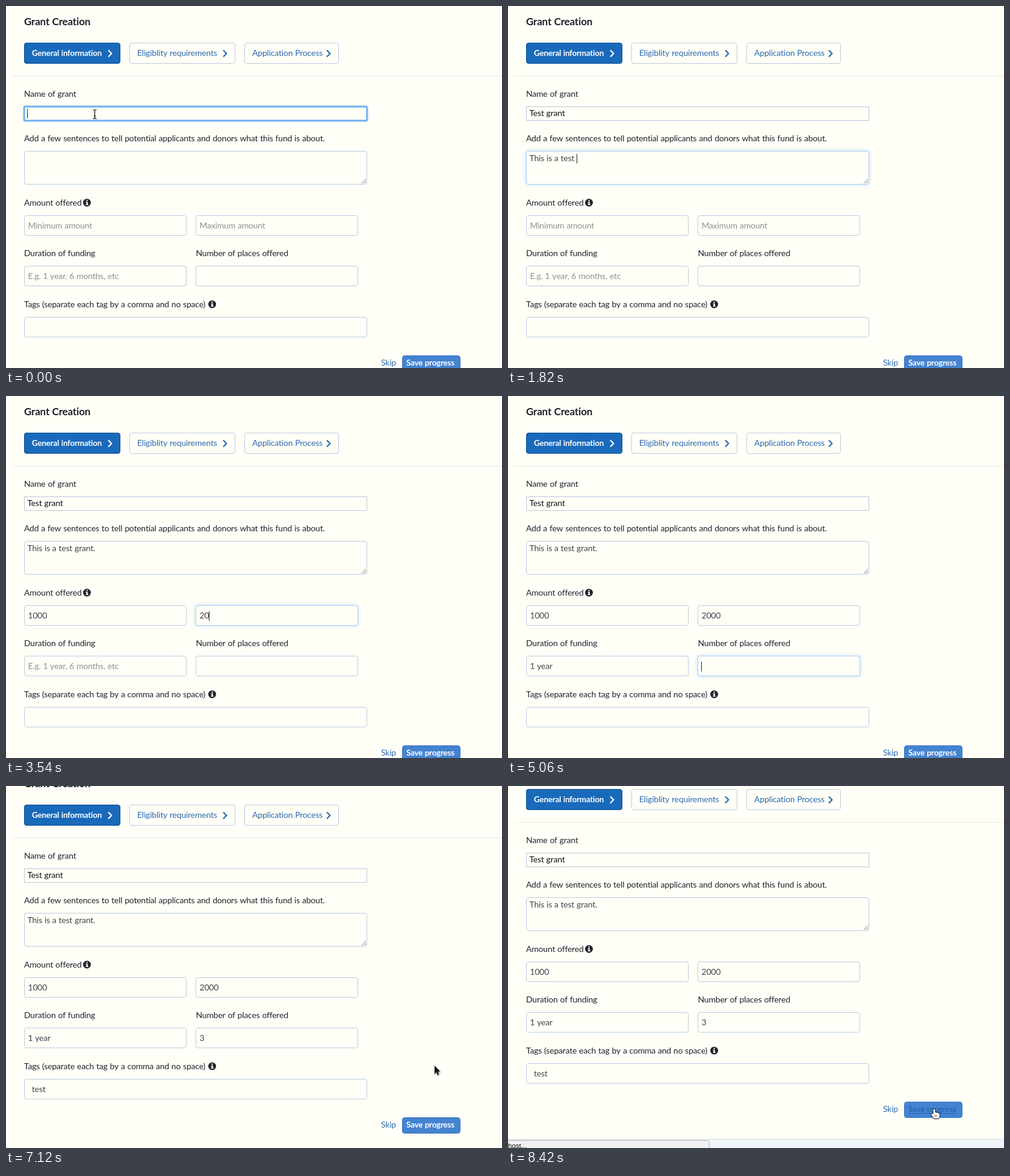
Recreate the animation shown at these times as an HTML page with a canvas. Size 824x602 px, loop 8440 ms.

```html
<!DOCTYPE html>
<html lang="en">
<head>
<meta charset="utf-8">
<title>Grant form</title>
<style>
html, body { margin: 0; width: 100%; height: 100%; overflow: hidden; background: #fffff8; }
canvas { display: block; width: 824px; height: 602px; }
</style>
</head>
<body>
<canvas id="stage" width="824" height="602"></canvas>
<script>
const ctx = document.getElementById('stage').getContext('2d');
const LOOP = 8440, PAGE = '#fffff8', INK = '#1f242b', LINK = '#2c6aae', EDGE = '#bccbe1';
const SANS = 'Lato, "Open Sans", sans-serif';
const ARIAL = '"Liberation Sans", Arial, sans-serif';

// Each field: box, text origin, value, focus span, typing span
const fields = [
  { x: 30, y: 167, w: 570, h: 24, tx: 35.5, ty: 183, value: 'Test grant', focus: [-1000, 1150], typing: [300, 960], plain: true },
  { x: 30, y: 241, w: 570, h: 56, tx: 35.5, ty: 258, value: 'This is a test grant.', focus: [1150, 2450], typing: [1220, 2060], area: true },
  { x: 30, y: 348, w: 270, h: 34, tx: 36.5, ty: 370, value: '1000', hint: 'Minimum amount', focus: [2450, 3160], typing: [2600, 2940] },
  { x: 315, y: 348, w: 270, h: 34, tx: 321.5, ty: 370, value: '2000', hint: 'Maximum amount', focus: [3160, 3980], typing: [3360, 3760] },
  { x: 30, y: 432, w: 270, h: 34, tx: 36.5, ty: 454, value: '1 year', hint: 'E.g. 1 year, 6 months, etc', focus: [3980, 4900], typing: [4120, 4640] },
  { x: 315, y: 432, w: 270, h: 34, tx: 321.5, ty: 454, value: '3', focus: [4900, 5700], typing: [5200, 5260] },
  { x: 30, y: 517, w: 570, h: 34, tx: 43, ty: 539, value: 'test', focus: [5700, 6860], typing: [5900, 6300] }
];
const labels = [
  ['Name of grant', 30, 151],
  ['Add a few sentences to tell potential applicants and donors what this fund is about.', 30, 225],
  ['Amount offered', 30, 332],
  ['Duration of funding', 30, 416],
  ['Number of places offered', 315.5, 416],
  ['Tags (separate each tag by a comma and no space)', 30, 501]
];
// Pointer path: time, x, y
const path = [
  [6400, 300, 192], [6560, 505, 212], [6700, 612, 342],
  [6860, 712, 465], [7420, 712, 465], [7760, 708, 537]
];

const clamp = v => Math.max(0, Math.min(1, v));
const ease = v => v * v * (3 - 2 * v);

function text(str, x, y, color, size = 14, weight = 400, family = SANS) {
  ctx.font = `${weight} ${size}px ${family}`;
  ctx.wordSpacing = family === SANS ? '0.5px' : '0px';
  ctx.letterSpacing = family === SANS ? '-0.2px' : '0px';
  ctx.fillStyle = color;
  ctx.fillText(str, x, y);
  return ctx.measureText(str).width;
}

function box(x, y, w, h, r, fill, stroke, line = 1) {
  ctx.beginPath();
  ctx.roundRect(x + .5, y + .5, w - 1, h - 1, r);
  if (fill) { ctx.fillStyle = fill; ctx.fill(); }
  if (stroke) { ctx.strokeStyle = stroke; ctx.lineWidth = line; ctx.stroke(); }
}

function lines(points, color, width) {
  ctx.beginPath();
  points.forEach(([x, y], i) => i ? ctx.lineTo(x, y) : ctx.moveTo(x, y));
  ctx.strokeStyle = color;
  ctx.lineWidth = width;
  ctx.stroke();
}

function tab(label, x, w, active) {
  const color = active ? '#fff' : LINK;
  box(x, 61, w, 35, 3.5, active ? '#196abb' : PAGE, active ? '#0d4f91' : EDGE);
  text(label, x + 13, 83, color, active ? 13.4 : 14, active ? 700 : 400);
  const cx = x + w - 20;
  lines([[cx, 73.5], [cx + 5.3, 79], [cx, 84.5]], color, 2.2);
}

function info(x, y) {
  ctx.fillStyle = INK;
  ctx.beginPath();
  ctx.arc(x, y, 6.5, 0, 7);
  ctx.fill();
  ctx.fillStyle = PAGE;
  ctx.fillRect(x - 1, y - 4.5, 2.2, 2);
  ctx.fillRect(x - 2, y - 1.3, 3.2, 1.3);
  ctx.fillRect(x - 1, y - 1, 2.2, 4.5);
  ctx.fillRect(x - 2, y + 2.6, 4.4, 1.4);
}

function field(f, t) {
  const [on, off] = f.focus;
  const focused = t >= on && t < off;
  const glow = clamp((t - on) / 150) * (1 - clamp((t - off) / 150));

  if (f.plain) {
    box(f.x, f.y, f.w, f.h, 0, PAGE, '#bcc6dc');
    if (focused) {
      box(f.x - .5, f.y - .5, f.w + 1, f.h + 1, 2, null, '#b4d7f8', 4);
      box(f.x, f.y, f.w, f.h, 1, null, '#68aceb', 2);
    }
  } else {
    box(f.x, f.y, f.w, f.h, 3.5, PAGE, EDGE);
    if (glow > 0) {
      ctx.save();
      ctx.globalAlpha = glow;
      ctx.shadowColor = 'rgba(110, 175, 245, .5)';
      ctx.shadowBlur = 7;
      box(f.x, f.y, f.w, f.h, 3.5, PAGE);
      ctx.shadowColor = 'transparent';
      box(f.x, f.y, f.w, f.h, 3.5, null, '#add0f4');
      ctx.restore();
    }
  }
  if (f.area) {
    const r = f.x + f.w - 2, b = f.y + f.h - 2;
    lines([[r - 7, b], [r, b - 7]], '#777', 1);
    lines([[r - 3, b], [r, b - 3]], '#777', 1);
  }

  const [start, end] = f.typing, n = f.value.length;
  const count = t < start ? 0 : Math.min(n, 1 + Math.floor((t - start) / (end - start) * (n - 1)));
  const typed = f.value.slice(0, count);
  let width = 0;
  if (typed) width = text(typed, f.tx, f.ty, f.plain ? '#101215' : '#424549');
  else if (f.hint) text(f.hint, f.tx, f.ty, '#8e9090');
  if (focused) {
    ctx.fillStyle = '#222';
    ctx.fillRect(Math.round(f.tx + width - .5), f.ty - 12, 1, 16);
  }
}

function saveButton(hover) {
  box(658, 581, 97, 27, 4, '#4483d0', '#3775c1');
  const color = hover ? '#2868b1' : '#fff';
  const w = text('Save progress', 665, 598, color, 13.4, 700);
  if (hover) ctx.fillRect(665, 600, w, 1);
}

function page(t, hover) {
  text('Grant Creation', 30, 32, INK, 17.1, 700);
  tab('General information', 30, 160, true);
  tab('Eligiblity requirements', 205, 176);
  tab('Application Process', 396, 157);
  ctx.fillStyle = '#ecece8';
  ctx.fillRect(10, 116, 814, 1);
  labels.forEach(([s, x, y]) => text(s, x, y, INK));
  info(134.5, 327);
  info(342.5, 496);
  fields.forEach(f => field(f, t));
  if (t >= 5900 && t < 6860) {
    box(30, 551, 571, 26, 0, '#fff', '#a9b9de');
    text('test,tester', 39, 570, '#000', 13.33, 700, ARIAL);
  }
  text('Skip', 623, 598, LINK);
  saveButton(hover);
  ctx.fillStyle = '#eef4fa';
  ctx.fillRect(0, 644, 824, 60);
  ctx.fillStyle = '#d5d8d8';
  ctx.fillRect(0, 643, 824, 1);
}

function statusBar() {
  box(-6, 589, 341, 24, 3, '#f1f1f1', '#b0b2b4');
  text('host...', 0, 602, '#111', 11.5, 400, ARIAL);
}

function pointerAt(t) {
  if (t < 280) return [147, 180];
  if (t < path[0][0]) return null;
  for (let i = 1; i < path.length; i++) {
    const [t0, x0, y0] = path[i - 1], [t1, x1, y1] = path[i];
    if (t < t1) {
      const u = (t - t0) / (t1 - t0), k = t0 > 7000 ? ease(u) : u;
      return [x0 + (x1 - x0) * k, y0 + (y1 - y0) * k];
    }
  }
  return path[path.length - 1].slice(1);
}

function shape(d, x, y, fill, stroke, width) {
  const p = new Path2D(d);
  ctx.save();
  ctx.translate(x, y);
  ctx.lineJoin = 'round';
  ctx.strokeStyle = stroke;
  ctx.lineWidth = width;
  ctx.stroke(p);
  if (fill) { ctx.fillStyle = fill; ctx.fill(p); }
  ctx.restore();
}

function pointer(x, y, hover) {
  if (hover) {
    const hand = 'M-1.5 1Q0-1 1.5 1V6Q3 5 4 6.5Q6 5.5 6.7 7.3Q9 6.8 9 9V12Q9 14 7 16H0Q-2 14-3 12.5L-5 9Q-5 7-3 8L-1.5 9.5Z';
    shape(hand, x, y, '#fff', '#111', 1.8);
    lines([[x + 1.5, y + 10], [x + 1.5, y + 13]], '#111', .8);
    lines([[x + 4, y + 10], [x + 4, y + 13]], '#111', .8);
  } else if (x < 603) {
    const beam = 'M-3-7.5Q0-7.5 0-5.5Q0-7.5 3-7.5M0-6V6M-3 7.5Q0 7.5 0 5.5Q0 7.5 3 7.5M-1.8 3H1.8';
    shape(beam, x + .5, y, null, 'rgba(255,255,255,.8)', 3);
    shape(beam, x + .5, y, null, '#111', 1.2);
  } else {
    ctx.save();
    ctx.shadowColor = 'rgba(0,0,0,.35)';
    ctx.shadowBlur = 2;
    ctx.shadowOffsetY = 1;
    shape('M0 0V13.5L3 10.7L5.1 15.5L7.5 14.5L5.4 9.8H9.5Z', x, y, '#111', '#fff', 1.8);
    ctx.restore();
  }
}

function draw(t) {
  const scroll = Math.round(56 * (1 - (1 - clamp((t - 6940) / 800)) ** 3));
  const pos = pointerAt(t);
  const hover = t > 7420 && pos[1] + scroll >= 581;
  ctx.fillStyle = PAGE;
  ctx.fillRect(0, 0, 824, 602);
  ctx.save();
  ctx.translate(0, -scroll);
  page(t, hover);
  ctx.restore();
  if (t >= 8000) statusBar();
  if (pos) pointer(Math.round(pos[0]), Math.round(pos[1]), hover);
}

const begin = performance.now();
function tick() {
  draw((performance.now() - begin) % LOOP);
  requestAnimationFrame(tick);
}
draw(0);
requestAnimationFrame(tick);
</script>
</body>
</html>
```
